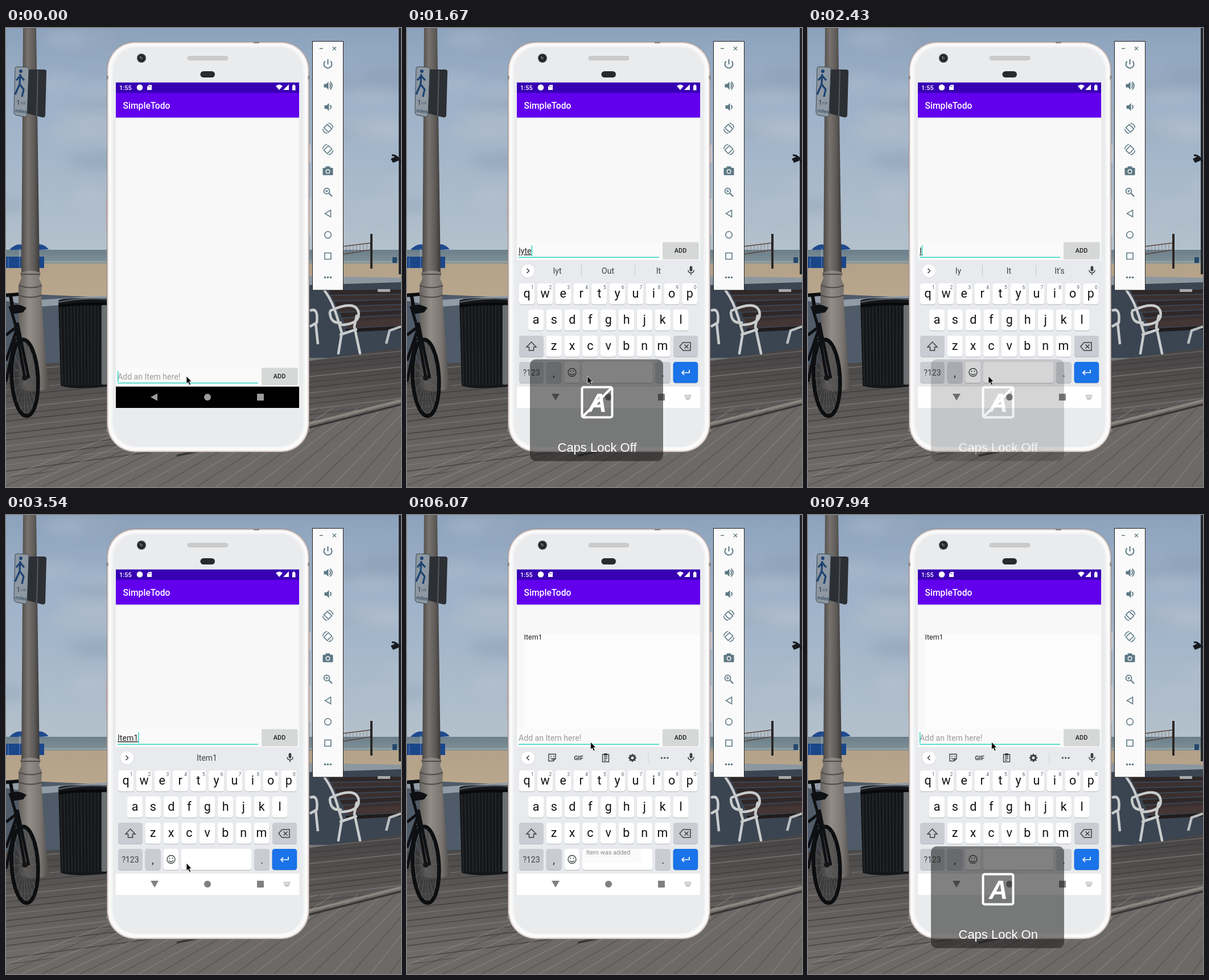
An HTML page for the animation above (8 s loop, 694 by 807 pixels).

```html
<!DOCTYPE html>
<html lang="en">
<head>
<meta charset="utf-8">
<title>Todo demo</title>
<style>
html, body { margin: 0; width: 100%; height: 100%; overflow: hidden; background: #777; }
svg { display: block; width: 694px; height: 807px; }
text { font-family: Roboto, "Noto Sans", sans-serif; white-space: pre; }
.osd text { font-family: "Liberation Sans", Arial, sans-serif; }
</style>
</head>
<body>
<svg id="stage" viewBox="0 0 694 807" xmlns="http://www.w3.org/2000/svg"></svg>
<script>
const range = (n, f) => Array.from({ length: n }, (_, i) => f(i)).join('');
const rect = (x, y, w, h, fill, r = 0, more = '') =>
  `<rect x="${x}" y="${y}" width="${w}" height="${h}" fill="${fill}" rx="${r}" ${more}/>`;
const circle = (x, y, r, fill, more = '') => `<circle cx="${x}" cy="${y}" r="${r}" fill="${fill}" ${more}/>`;
const shape = (d, fill, more = '') => `<path d="${d}" fill="${fill}" ${more}/>`;
const line = (d, color, w = 1, more = '') =>
  `<path d="${d}" fill="none" stroke="${color}" stroke-width="${w}" ${more}/>`;
const text = (x, y, size, fill, str, more = '') =>
  `<text x="${x}" y="${y}" font-size="${size}" fill="${fill}" ${more}>${str}</text>`;
const mid = 'text-anchor="middle"';
const group = (attrs, inner) => `<g ${attrs}>${inner}</g>`;
const at = (x, y, inner) => group(`transform="translate(${x} ${y})"`, inner);
const gradient = (id, dir, ...stops) => `<linearGradient id="${id}" ${dir}>` +
  stops.map(([o, c]) => `<stop offset="${o}" stop-color="${c}"/>`).join('') + '</linearGradient>';
const down = 'x1="0" y1="0" x2="0" y2="1"';

let seed = 7;
const rand = () => (seed = seed * 16807 % 2147483647) / 2147483647;

const defs = `<defs>
  ${gradient('sky', down, [0, '#8ca2bc'], [.3, '#9db1c8'], [.6, '#a5b7ca'], [1, '#b4c1cc'])}
  ${gradient('sea', down, [0, '#6b7f8b'], [1, '#839397'])}
  ${gradient('sand', down, [0, '#b3a189'], [1, '#bba88d'])}
  ${gradient('deck', down, [0, '#454343'], [.4, '#5b5857'], [1, '#74706d'])}
  ${gradient('pole', '', [0, '#4b4846'], [.35, '#77726d'], [.7, '#5f5b58'], [1, '#3b3938'])}
  ${gradient('base', '', [0, '#65615d'], [.35, '#928d86'], [.7, '#7b7671'], [1, '#4d4a48'])}
  <filter id="soft" x="-30%" y="-60%" width="160%" height="220%"><feGaussianBlur stdDeviation="11"/></filter>
  <clipPath id="screen">${rect(193, 95.5, 322, 572.5, '#000')}</clipPath>
  <clipPath id="boards"><path d="M0 592L180 585H535L694 562V807H0Z"/></clipPath>
</defs>`;

function scenery() {
  const clouds = range(22, i => {
    const x = i % 2 ? 540 + rand() * 170 : rand() * 190;
    const y = rand() * 340, w = 25 + rand() * 65;
    return `<ellipse cx="${x}" cy="${y}" rx="${w}" ry="${7 + rand() * 14}"
      fill="${i % 3 ? '#b6c2cf' : '#879aaf'}" opacity=".45"/>`;
  });
  const planks = range(30, i => line(`M-5 ${604 + i * 11}L700 ${540 + i * 9.2}`,
    i % 3 ? '#383636' : '#85817d', i % 2 ? 1.2 : 1.7, 'opacity=".65"'));
  const slats = range(34, i => line(`M${-40 + i * 34} 807L${310 + i * 22} 668`,
    i % 2 ? '#4a4746' : '#918d88', 1.4, 'opacity=".6"'));
  return rect(0, 0, 694, 392, 'url(#sky)') + group('filter="url(#soft)"', clouds) +
    rect(0, 390, 694, 26, 'url(#sea)') + line('M0 411H694', '#a3adaf', 1.5) +
    rect(0, 414, 694, 72, 'url(#sand)') +
    shape('M0 466L180 474V600H0Z', '#4f5b69') + shape('M0 466L60 478L180 470V480L60 490L0 480Z', '#929ca6') +
    shape('M530 438L694 440V580H530Z', '#3b4552') + shape('M530 436L694 439V447L530 452Z', '#8d979f') +
    group('clip-path="url(#boards)"', rect(0, 560, 694, 247, 'url(#deck)') + planks +
      shape('M0 807V795L535 692L694 652V807Z', '#6d6966') + slats +
      line('M300 745L535 695L694 655', '#8b867f', 4) + line('M300 752L535 702L694 662', '#393636', 3.5));
}

function leftProps() {
  const spokes = range(18, i => {
    const a = i * Math.PI / 9;
    return line(`M33 615L${33 + 21 * Math.cos(a)} ${615 + 64 * Math.sin(a)}`, '#6a6a6a', .6);
  });
  const runner = circle(26, 76, 3, '#1c4272') +
    line('M25 81L24 99L31 108L28 121M24 99L19 110L16 117M25 84L32 92M25 84L18 92', '#1c4272', 3.2, 'stroke-linejoin="round"');
  const canRibs = range(14, i => line(`M${96 + i * 6} 488L${99 + i * 5.7} 628`, '#2b2e32', 1.3));
  return shape('M6 390Q22 372 42 388Q60 372 75 389L60 390H12Z', '#1f4a8e') +
    line('M24 388V404M52 388V404', '#bbb') + rect(0, 402, 67, 20, '#1a468a') +
    line('M4 404V422M24 402V422M46 402V422', '#4d70a8', 1.5) +
    shape('M30 0H53L59 430H27Z', 'url(#pole)') +
    shape('M25 430Q43 423 61 430L58 440L63 452L62 470L71 600L76 632Q50 646 22 632L22 470V452L27 440Z', 'url(#base)') +
    line('M26 433H60M23 453Q43 460 63 453M22 470Q43 477 63 470', '#4f4b48', 2) +
    shape('M39 73L68 73Q72 74 71 79L69 154Q68 158 63 157L37 150Z', '#2c2f34') + line('M56 75L54 155', '#54585f', 2) +
    shape('M19 68L38 69Q41 70 40 75L37 152Q36 157 32 156L17 153Q14 152 14 147L16 72Q16 68 19 68Z', '#8d98a2', 'stroke="#39464f"') +
    runner + text(18, 135, 12, '#1f3953', '1', 'transform="rotate(3 18 135)"') +
    text(25, 134, 6, '#1f3953', '1/2') + text(16, 148, 8.5, '#1f3953', 'miles', 'transform="rotate(6 16 148)"') +
    shape('M92 480Q92 475 134 475H180V630Q120 637 96 629Z', '#141619') + canRibs +
    line('M92 482Q134 473 180 477', '#555b61', 2.5) + line('M93 489Q134 483 180 486', '#08090a', 5) +
    rect(168, 487, 9, 140, '#8d9396', 2, 'opacity=".7"') +
    group('transform="rotate(-3 33 615)"',
      '<ellipse cx="33" cy="615" rx="23" ry="67" fill="#2b2b2c" fill-opacity=".55" stroke="#0d0e10" stroke-width="7"/>' +
      spokes + '<ellipse cx="33" cy="615" rx="19" ry="62" fill="none" stroke="#55585c"/>') +
    line('M33 615L16 520L8 492M40 616L20 518M0 540L18 526M0 585L18 532M0 622L16 545', '#0f1013', 5) +
    line('M0 470L22 468M8 470L12 495', '#0d0e10', 6) + shape('M4 490Q20 482 36 492L30 500L12 503Z', '#0f1013') +
    circle(33, 615, 5, '#151515');
}

function rightProps() {
  const net = range(9, i => line(`M${592 + i * 6} ${384 - i * .6}V${398 - i}`, '#655f59', .6));
  const back = range(6, i => shape(`M${567 + i * 5} ${461 + i * 10}L694 ${460 + i * 9}V${467 + i * 9}L${570 + i * 5} ${469 + i * 10}Z`,
    i % 2 ? '#3b302f' : '#2f2727'));
  return line('M692 0V433', '#23262b', 4) + line('M678 224Q686 222 694 236', '#16191d', 3) +
    shape('M676 230L686 225L690 233L680 237Z', '#16191d') +
    net + line('M592 384L640 378M592 398L640 390', '#59453a', 1.4) + rect(640, 362, 4, 61, '#2b2826') +
    rect(679, 403, 8, 10, '#26486c') + back +
    shape('M594 516L694 511V523L600 527Z', '#443635') + shape('M596 529L694 524V530L600 535Z', '#201b1b') +
    rect(653, 459, 22, 5, '#a5a9ab') +
    line('M560 462Q575 482 584 516L590 536L584 572M570 497Q612 478 619 498Q624 520 590 522M616 506L612 525L622 572M588 539L615 530M569 500Q570 520 588 518', '#c9cccc', 4.5, 'stroke-linecap="round"') +
    line('M694 525L674 532L668 555', '#b9bdbf', 4.5) +
    line('M534 497Q549 490 546 518L534 525M544 518L548 556', '#c9cccc', 4.5);
}

function phoneBody() {
  return rect(531, 205, 4, 32, '#d8cfcd', 1) + rect(531, 300, 4, 64, '#d8cfcd', 1) + rect(175.5, 295, 3, 60, '#b9afad', 1) +
    rect(177.5, 24.5, 355, 721, '#e0d6d4', 49, 'stroke="#958c8a"') +
    rect(180, 27, 350, 716, '#fbfafa', 47) +
    rect(185, 31, 340, 706, '#f3f3f4', 43) + rect(188, 34, 334, 702, '#e9ebed', 41) +
    rect(185, 88, 340, 596, '#f2f3f4') + rect(188, 88, 334, 596, '#e9ebed') +
    line('M178 84V90M532 84V90M178 704V710M532 704V710', '#8b8381', 3) + rect(435, 24, 10, 3, '#8d8786') +
    circle(238, 53, 8, '#45494c') + circle(238, 53, 6.3, '#202226') + circle(238, 53, 2.6, '#4c5359') + circle(236, 51, 1, '#aaa') +
    rect(319, 49.5, 71, 7, '#cbcbcb', 3.5, 'stroke="#bbb" stroke-width=".6"') +
    rect(341.5, 76, 25.5, 11, '#292a2d', 5.5);
}

function appFrame() {
  return rect(193, 95, 322, 573, '#f8f8f8') + rect(193, 157.5, 322, 2, '#eee') +
    rect(193, 95.5, 322, 18.5, '#3700b3') + rect(193, 114, 322, 43.5, '#6200ee') +
    text(199, 109, 11, '#fff', '1:55', 'font-weight="500"') + circle(235, 104.5, 5.3, '#fff') +
    shape('M251 100H256V109H248V103Z', '#fff') + line('M251 102V104M253 102V104', '#3700b3', .8) +
    shape('M474 102Q480 97 486 102L480 109Z', '#fff') + shape('M497 99V109H487Z', '#fff') +
    shape('M503 101H504.5V99.5H507V101H508.5V109.5H503Z', '#fff') +
    text(205.5, 142, 15.67, '#fff', 'SimpleTodo', 'font-weight="500"') +
    group('id="item"', rect(205, 210, 310, 167, '#fcfcfc') + text(205.5, 219, 12.53, '#212121', 'Item1'));
}

const inputRow = () => group('id="input"',
  rect(193, 376, 256, 30, '#fafafa') +
  text(196, 397, 14.1, '#9a9a9a', 'Add an Item here!', 'id="hint"') +
  text(196, 397, 14.1, '#222', '', 'id="typed" text-decoration="underline"') +
  rect(196, 402.5, 247, 1.5, '#2bd5c1') + rect(196, 382, 1.5, 19, '#2bd5c1', 0, 'id="caret"') +
  rect(449, 377.5, 63.5, 29, '#b9b9b9', 2, 'opacity=".6"') + rect(449, 376.5, 63, 28.5, '#d6d7d7', 1.5, 'id="button"') +
  text(480.5, 395, 10.96, '#1e1e1e', 'ADD', mid + ' font-weight="500"'));

function keyboard() {
  const dark = '#c9ccd3', ink = '#3c4043', pitch = 31.8;
  const box = (x, y, w, fill) => rect(x, y + 1, w, 37, '#b4b7bb', 4.5) + rect(x, y, w, 37, fill, 4.5);
  const row = (letters, x0, y) => [...letters].map((c, i) => {
    const x = x0 + i * pitch;
    const digit = y < 460 ? text(x + 9.5, y + 9.5, 8.5, '#5f6368', (i + 1) % 10, mid) : '';
    return box(x - 13.7, y, 27.4, '#fff') + text(x, y + 25, 21.5, '#111', c, mid) + digit;
  }).join('');
  const tools = at(255, 426.5, line('M-6 -6H6V2L2 6H-6ZM2 6V2H6M-3 1Q0 4 2 1', ink, 1.4) + circle(-2, -2, 1, ink) + circle(3, -2, 1, ink)) +
    text(301.5, 430.5, 11, ink, 'GIF', mid + ' font-weight="700"') +
    at(349, 427, line('M-5.5 -6H5.5V7H-5.5ZM-3 -2H3M-3 1H3M-3 4H1', ink, 1.4) + rect(-3, -8, 6, 4, ink, 1)) +
    at(396, 427, circle(0, 0, 4, 'none', `stroke="${ink}" stroke-width="3"`) +
      range(8, i => line('M0 -4.5V-7', ink, 2.6, `transform="rotate(${i * 45})"`))) +
    line('M424 419V435', '#c9ccd0') + [447.5, 452.7, 458].map(x => circle(x, 427, 1.6, ink)).join('');
  const words = group('id="seps"', line('M306.5 417V436M400.5 417V436', '#c3c6ca')) +
    [264, 353, 442].map((x, i) => text(x, 432, 14, ink, '', `${mid} id="word${i}"`)).join('');
  return group('id="keys"', rect(193, 408, 322, 223, '#e8eaed') +
    circle(212.5, 427.5, 12, '#cfd1d4') + circle(212.5, 427, 11.6, '#fff') +
    group('id="tools"', tools + line('M214.5 423L210.5 427L214.5 431', ink, 1.6)) +
    group('id="words"', words + line('M210.5 423L214.5 427L210.5 431', ink, 1.6)) +
    at(499, 426.5, rect(-2.4, -8, 4.8, 9.5, ink, 2.4) + line('M-5 -1Q-5 4 0 4T5 -1M0 4V8', ink, 1.5)) +
    row('qwertyuiop', 210.7, 449) + row('asdfghjkl', 226.6, 495) + row('zxcvbnm', 258.2, 541) +
    box(197, 541, 43, dark) + line('M218.5 552L227 561H222.5V567H214.5V561H210Z', ink, 1.5) +
    box(468, 541, 43, dark) + line('M485 553H498V567H485L479 560ZM487.5 556.5L494.5 563.5M494.5 556.5L487.5 563.5', ink, 1.5) +
    box(197, 587, 43, dark) + text(218.5, 611, 14, ink, '?123', mid) +
    box(244.6, 587, 27, dark) + text(258, 613, 18, '#222', ',', mid) +
    box(276.3, 587, 27, '#fff') + circle(290, 605.5, 7, 'none', `stroke="${ink}" stroke-width="1.4"`) +
    circle(287.4, 603.5, 1.1, ink) + circle(292.6, 603.5, 1.1, ink) + line('M286 607.5Q290 612 294 607.5', ink, 1.3) +
    box(308, 587, 123.5, '#fff') + box(436, 587, 27, dark) + text(449.5, 613, 18, '#222', '.', mid) +
    box(467.6, 587, 43.6, '#1a73e8') + line('M496 601V606H483M487 602L483 606L487 610', '#fff', 1.7));
}

const navButtons = (back, background, color) => rect(193, 630.5, 322, 37.5, background) +
  shape(back, color) + circle(354, 649, 6, color) + rect(441, 643, 12, 12, color, 1);
const navBar = () =>
  group('id="nav"', navButtons('M254 649L266 642.5V655.5Z', '#000', '#9b9b9b')) +
  group('id="navLight"', navButtons('M254 643H268L261 655Z', '#fff', '#808080') +
    line('M488 646H499M488 649H499', '#888', 1.6, 'stroke-dasharray="1.6 .75"') + line('M490 652H497', '#888', 1.4));

function emulatorBar() {
  const c = '#5c7884';
  const speaker = shape('M-7 -3H-3L1 -7V7L-3 3H-7Z', c);
  const turn = flip => group(`transform="scale(${flip} 1)"`,
    line('M-1 -7L7 1L1 7L-7 -1Z', c, 1.6) + line('M1 -9Q8 -8 9 -1M-1 9Q-8 8 -9 1', c, 1.5));
  const icons = [
    line('M0 -9V0M-5 -5.5A7 7 0 1 0 5 -5.5', c, 2),
    speaker + line('M3 -4Q6 0 3 4M4 -7Q11 0 4 7', c, 1.8),
    group('transform="translate(1 0)"', speaker + line('M3 -3.5Q6 0 3 3.5', c, 1.8)),
    turn(1), turn(-1),
    rect(-9, -5.5, 18, 13, c, 1.5) + rect(-4, -8, 8, 4, c, 1) + circle(0, 1, 4, '#fafafa') + circle(0, 1, 2.6, c),
    circle(-2, -2, 5, 'none', `stroke="${c}" stroke-width="1.7"`) + line('M2 2L7.5 7.5', c, 2.2) + line('M-4.5 -2H.5M-2 -4.5V.5', c, 1.2),
    line('M5 -6V6L-5 0Z', c, 1.6),
    circle(0, 0, 5.8, 'none', `stroke="${c}" stroke-width="1.6"`),
    line('M-5.5 -5.5H5.5V5.5H-5.5Z', c, 1.6),
    [-5, 0, 5].map(x => circle(x, 0, 1.8, c)).join('')
  ];
  return rect(538.5, 23.5, 54, 437.5, '#fafafa', 0, 'stroke="#222"') +
    line('M551 36H557M574 33L580 39M580 33L574 39', c, 1.3) +
    icons.map((icon, i) => at(565.5, 64 + i * 37.45, icon)).join('');
}

const overlay = () => group('id="osd" class="osd"',
  rect(216, 582.5, 234, 179, '#1a1a1a', 10, 'opacity=".55"') +
  rect(307.5, 631.5, 53, 53, 'none', 3, 'stroke="#fff" stroke-width="4"') +
  text(334.5, 675, 46, '#fff', 'A', mid + ' font-weight="700" font-style="italic"') +
  line('M309 683L359 633', '#fff', 4, 'id="slash"') +
  text(264.5, 745, 22, '#fff', '', 'id="caps"'));

document.getElementById('stage').innerHTML = defs + scenery() + leftProps() + rightProps() + phoneBody() +
  group('clip-path="url(#screen)"', appFrame() + inputRow() + keyboard() + navBar()) +
  group('id="toast"', rect(309, 588, 103, 24, '#fafafa', 4) + text(315, 597, 10.96, '#8b8b8b', 'Item was added')) +
  emulatorBar() + overlay() +
  shape('M0 0V13.5L3 10.8L5.2 15.8L7.6 14.7L5.4 9.8H9.3Z', '#000', 'id="pointer" stroke="#fff" stroke-width=".8"');

const el = {};
document.querySelectorAll('#stage [id]').forEach(n => el[n.id] = n);

// Each step overrides part of the state before it.
const steps = [
  [0, { slide: null, caret: 1, typed: '', words: null, osd: 0, caps: 'On', mouse: [317, 612], item: 0, toast: 0, press: 0 }],
  [150, { slide: 160 }], [290, { slide: 45 }], [430, { slide: 0 }], [570, { caret: 0 }], [840, { caret: 1 }],
  [1250, { osd: 1 }],
  [1390, { typed: 'I', words: ['I', 'It', "I'm"] }],
  [1530, { typed: 'Iy', caps: 'Off' }],
  [1670, { typed: 'Iyte', words: ['Iyt', 'Out', 'It'] }],
  [1950, { osd: .86 }], [2080, { typed: 'Iyt', osd: .72 }], [2210, { typed: 'Iy', osd: .57 }],
  [2320, { typed: 'I', osd: .45, words: ['Iy', 'It', "It's"] }],
  [2430, { osd: .33 }],
  [2580, { typed: 'It', osd: .17 }],
  [2730, { typed: 'Item', osd: 0 }],
  [3000, { words: ['Item', 'Items', 'Item2'] }], [3140, { typed: 'Item1' }],
  [3270, { words: ['', 'Item1', ''] }], [3400, { caret: 0 }], [3540, { caret: 1 }],
  [3970, { mouse: [405, 430], caret: 0 }], [4090, { mouse: [431, 337] }],
  [4370, { mouse: [462, 375] }], [4520, { mouse: [471, 390], caret: 1 }],
  [4800, { press: 1 }], [4930, { press: 0, typed: '', item: 1 }],
  [5070, { toast: .55 }], [5200, { toast: 1 }], [5350, { words: null }],
  [5490, { mouse: [440, 393] }], [5630, { mouse: [365, 398] }], [5770, { mouse: [322.5, 399] }],
  [6070, { caret: 0 }], [6520, { caret: 1 }], [6970, { caret: 0 }], [7120, { caret: 1 }],
  [7240, { toast: .5 }], [7360, { toast: 0, caret: 0 }],
  [7820, { osd: 1, caps: 'On' }], [7940, { caret: 1 }]
];

const show = (node, opacity) => node.setAttribute('opacity', +opacity);
const move = (node, x, y) => node.setAttribute('transform', `translate(${x} ${y})`);

function render(t) {
  const s = Object.assign({}, ...steps.filter(([start]) => start <= t).map(step => step[1]));
  const open = s.slide !== null;
  show(el.keys, open);
  move(el.keys, 0, s.slide || 0);
  show(el.nav, !open);
  show(el.navLight, open);
  move(el.input, 0, open && s.slide < 100 ? 0 : 221);
  show(el.hint, !s.typed);
  el.typed.textContent = s.typed;
  el.caret.setAttribute('x', 196 + (s.typed ? el.typed.getComputedTextLength() : 0));
  show(el.caret, s.caret);
  el.button.setAttribute('fill', s.press ? '#bfc0c0' : '#d6d7d7');
  show(el.tools, !s.words);
  show(el.words, !!s.words);
  show(el.seps, !!(s.words && s.words[0]));
  for (let i = 0; i < 3; i++) el['word' + i].textContent = s.words ? s.words[i] : '';
  show(el.item, s.item);
  show(el.toast, s.toast);
  show(el.osd, s.osd);
  show(el.slash, s.caps === 'Off');
  el.caps.textContent = 'Caps Lock ' + s.caps;
  move(el.pointer, ...s.mouse);
}

const start = performance.now();
function tick() {
  render((performance.now() - start) % 8000);
  requestAnimationFrame(tick);
}
tick();
</script>
</body>
</html>
```
